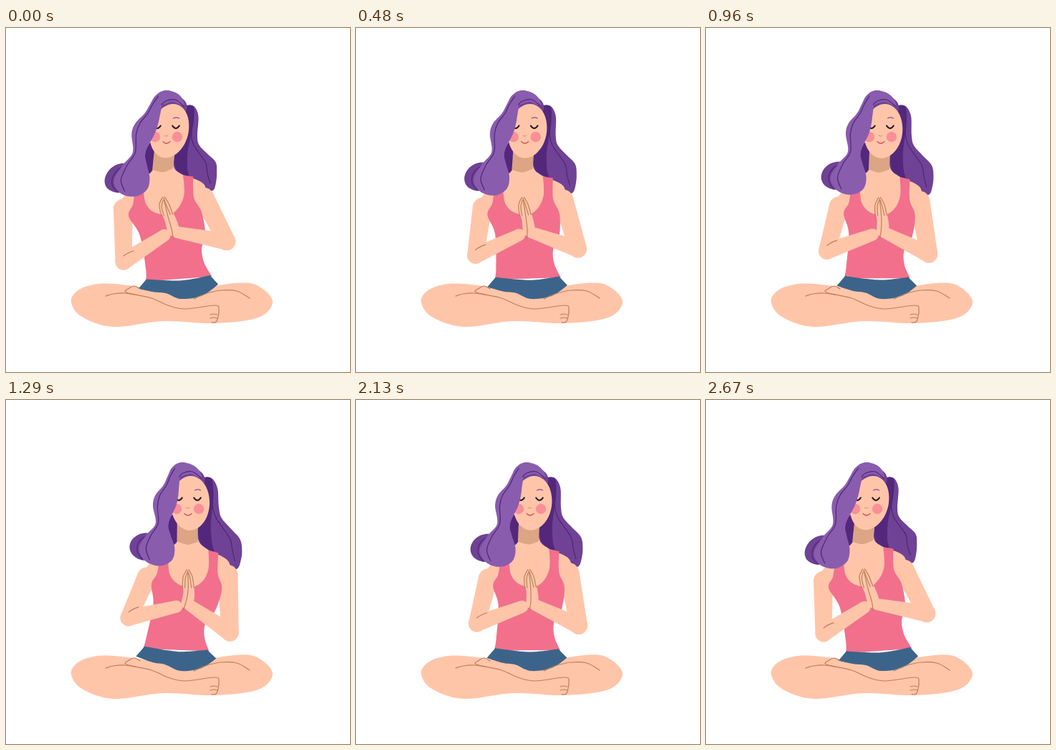
Animation of 480x480 px, one loop 2700 ms. Source, as an HTML page with a canvas:

```html
<!DOCTYPE html>
<html lang="en">
<head>
<meta charset="utf-8">
<title>Seated sway</title>
<style>
html, body { margin: 0; width: 100%; height: 100%; overflow: hidden; background: #fff; }
canvas { display: block; width: 100vw; height: 100vh; }
</style>
</head>
<body>
<canvas id="stage" width="480" height="480"></canvas>
<script>
const ctx = document.getElementById('stage').getContext('2d');
const LOOP = 2700;
const SKIN = '#ffc5a9', BROWN = '#bb8059', PINK = '#f2708c', BLUE = '#3c648a';
const HAIR = '#895cad', MID = '#6f4295', DARK = '#53277c', STRAND = '#4f2678', EYE = '#2b1a25';

const ease = x => x * x * (3 - 2 * x);
const mix = (a, b, k) => a + (b - a) * k;

// Shapes are drawn leaning right; lean = 1 bends them fully to the left.
let lean = 0;

// How far each height moves when leaning left: [y, shift, tilt].
const spine = [
  [87, -25, 0], [150, -34, 0], [210, -40, 0.13], [255, -37, 0.13],
  [312, -6, 0.13], [350, 5, 0.13], [378, 0, 0]];

function bend(x, y) {
  const i = Math.max(1, spine.findIndex(s => s[0] > y));
  const [a, b] = y < 378 ? [spine[i - 1], spine[i]] : [spine[6], spine[6]];
  const k = a === b ? 0 : (y - a[0]) / (b[0] - a[0]);
  return [x + lean * mix(a[1], b[1], k), y + lean * mix(a[2], b[2], k) * (250 - x)];
}

// Two eased steps to the right, then one long return.
function leanAt(t) {
  if (t < 800) return 1 - 0.53 * ease(t / 800);
  if (t < 1600) return 1 - mix(0.53, 1.06, ease((t - 800) / 800));
  return 1 - 1.06 * (1 - ease((t - 1600) / (LOOP - 1600)));
}

// Smooth curve through bent points; a third value marks a corner.
function trace(points, closed) {
  const n = points.length;
  const p = points.map(([x, y, corner]) => [...bend(x, y), corner ? 0 : 1 / 6]);
  const at = i => closed ? p[(i + n) % n] : p[Math.max(0, Math.min(n - 1, i))];
  ctx.beginPath();
  ctx.moveTo(p[0][0], p[0][1]);
  for (let i = 0; i < (closed ? n : n - 1); i++) {
    const [a, b, c, d] = [at(i - 1), at(i), at(i + 1), at(i + 2)];
    ctx.bezierCurveTo(
      b[0] + (c[0] - a[0]) * b[2], b[1] + (c[1] - a[1]) * b[2],
      c[0] - (d[0] - b[0]) * c[2], c[1] - (d[1] - b[1]) * c[2], c[0], c[1]);
  }
}

function fill(points, color) {
  trace(points, true);
  ctx.fillStyle = color;
  ctx.fill();
}

function line(points, color = BROWN, width = 1.2) {
  trace(points, false);
  ctx.strokeStyle = color;
  ctx.lineWidth = width;
  ctx.stroke();
}

function blob(cx, cy, rx, ry, color) {
  const ring = Array.from({ length: 12 }, (_, i) => {
    const a = i * Math.PI / 6;
    return [cx + rx * Math.cos(a), cy + ry * Math.sin(a)];
  });
  fill(ring, color);
}

function disc(x, y, r, color) {
  ctx.beginPath();
  ctx.arc(x, y, r, 0, Math.PI * 2);
  ctx.fillStyle = color;
  ctx.fill();
}

function arc(x, y, width, depth, color, weight) {
  ctx.beginPath();
  ctx.moveTo(x - width / 2, y);
  ctx.quadraticCurveTo(x, y + depth * 2, x + width / 2, y);
  ctx.strokeStyle = color;
  ctx.lineWidth = weight;
  ctx.stroke();
}

// A lock is a list of [y, middle, half width]; its side runs from -1 to 1.
const side = (lock, k) => lock.map(([y, x, w]) => [x + k * w, y]);
const fillLock = (lock, color) => fill([...side(lock, -1), ...side(lock, 1).reverse()], color);

// Tapered limb with round ends.
function limb([x1, y1], r1, [x2, y2], r2) {
  const a = Math.atan2(y2 - y1, x2 - x1) + Math.PI / 2;
  const dx = Math.cos(a), dy = Math.sin(a);
  disc(x1, y1, r1, SKIN);
  disc(x2, y2, r2, SKIN);
  ctx.beginPath();
  ctx.moveTo(x1 + dx * r1, y1 + dy * r1);
  ctx.lineTo(x2 + dx * r2, y2 + dy * r2);
  ctx.lineTo(x2 - dx * r2, y2 - dy * r2);
  ctx.lineTo(x1 - dx * r1, y1 - dy * r1);
  ctx.fill();
}

const frontLock = [
  [88, 249, 5], [95, 246, 12], [106, 238, 9], [119, 234, 11], [133, 228, 16], [148, 225, 16],
  [172, 222, 9], [188, 217, 17], [206, 215, 25], [222, 217, 20], [230, 218, 7]];
const rightLock = [
  [108, 284, 4], [113, 281, 13], [125, 280, 19], [150, 280, 21], [165, 286, 19],
  [180, 292, 26], [195, 297, 34], [212, 301, 33], [226, 312, 20], [236, 324, 4]];
const innerShade = [[110, 284, 6], [130, 285, 8], [150, 284, 8], [175, 281, 9], [200, 284, 8], [212, 292, 3]];

const chest = [
  [243, 172, 1], [243, 198], [208, 224], [200, 250], [258, 285],
  [306, 262], [316, 228], [286, 209], [273, 196], [272, 172, 1]];
const vest = [
  [218, 226, 1], [215, 242], [207, 257], [208, 284], [196, 330], [191, 346, 1],
  [283, 351, 1], [277, 332], [279, 312], [294, 294], [305, 264], [300, 243], [301, 214, 1],
  [287, 210, 1], [287, 236], [278, 254], [261, 262], [243, 256], [233, 243], [231, 224, 1]];
const shorts = [
  [193, 343, 1], [240, 351], [280, 349, 1], [293, 361, 1],
  [273, 374], [244, 378], [222, 369], [205, 366], [181, 357, 1]];
const legs = [
  [91, 383], [98, 368], [118, 359], [150, 357], [240, 366], [320, 356], [352, 360],
  [372, 382], [352, 404], [292, 412], [220, 409], [150, 417], [106, 403]];

function drawBackHair() {
  blob(200, 204, 23, 19, MID);
  line([[206, 186], [191, 196], [188, 210], [195, 222]], STRAND);
  blob(240, 180, 10, 22, DARK);
  fillLock(rightLock, MID);
  fillLock(innerShade, DARK);
  line(side(rightLock.slice(1, -1), 0.6), STRAND);
}

function drawHands() {
  fill([[258, 236], [265, 248], [266, 275], [260, 288], [247, 288], [251, 268], [251, 248]], SKIN);
  line([[258, 238], [258, 264], [254, 281], [249, 294]]);
  for (const s of [-1, 1]) {
    line([[258 + 8 * s, 262], [258 + 6.5 * s, 247], [258 + 1.5 * s, 237]]);
    line([[258 + 4.5 * s, 262], [258 + 3.5 * s, 250], [258 + s, 241]]);
  }
}

function drawUpperBody() {
  const leftElbow = [mix(172, 164, lean), mix(301, 326, lean)];
  const rightElbow = [mix(313, 308, lean), mix(328, 298, lean)];
  fill(chest, SKIN);
  limb(bend(201, 246), 13.5, leftElbow, 11.5);
  limb(bend(314, 245), 14, rightElbow, 12.3);
  fill(vest, PINK);
  limb(leftElbow, 11.5, bend(240, 288), 8.5);
  limb(rightElbow, 12, bend(258, 286), 8);
  drawHands();

  const [x, y] = leftElbow;
  ctx.beginPath();
  ctx.moveTo(x, y - 8);
  ctx.quadraticCurveTo(x + 5, y - 12, x + 14, y - 15);
  ctx.stroke();
}

function drawLegs() {
  const hold = lean;
  lean = 0;
  fill(legs, SKIN);
  lean = hold;
  fill(shorts, BLUE);
  lean = 0;
  line([[139, 374], [150, 371], [165, 370], [180, 372]]);
  line([[187, 364], [179, 360], [172, 363], [168, 369], [203, 377], [226, 387], [250, 392],
    [291, 387], [297, 393], [294, 409], [287, 411]]);
  line([[262, 378], [278, 371], [300, 366], [322, 367], [340, 377]]);
  for (const y of [400, 405]) line([[285, y], [290, y - 1], [295, y]]);
  lean = hold;
}

function drawHead() {
  fill([[243, 170, 1], [243, 197, 1], [258, 202], [272, 198, 1], [272, 170, 1]], '#dca584');
  blob(260, 112, 21, 17, MID);
  blob(261, 144, 27, 38, SKIN);

  ctx.save();
  ctx.translate(...bend(261, 150));
  for (const x of [-19, 12]) disc(x, 2, 7.2, '#fa8f97');
  for (const x of [-16, 10]) arc(x, -13.5, 9.5, 3.5, EYE, 2.2);
  arc(10.5, -24, 8, -1.2, '#84509a', 1.2);
  arc(-3.5, 0, 4.5, 1, '#e0936f', 1.1);
  arc(-3, 8.5, 10, 2.5, '#cf4c58', 1.2);
  ctx.restore();
}

function drawFrontHair() {
  fill([[236, 100], [238, 91], [249, 87], [264, 91], [273, 99], [276, 109], [260, 103], [245, 107]], HAIR);
  fillLock(frontLock, HAIR);
  line(side(frontLock.slice(1, -1), -0.6), STRAND);
  line([[245, 107], [250, 102], [263, 100], [276, 109]], STRAND);
}

function tick() {
  const t = performance.now() % LOOP;
  lean = leanAt(Math.floor(t / 30) * 30);
  ctx.fillStyle = '#fff';
  ctx.fillRect(0, 0, 480, 480);
  ctx.lineCap = ctx.lineJoin = 'round';
  drawBackHair();
  drawUpperBody();
  drawLegs();
  drawHead();
  drawFrontHair();
  requestAnimationFrame(tick);
}
tick();
</script>
</body>
</html>
```
